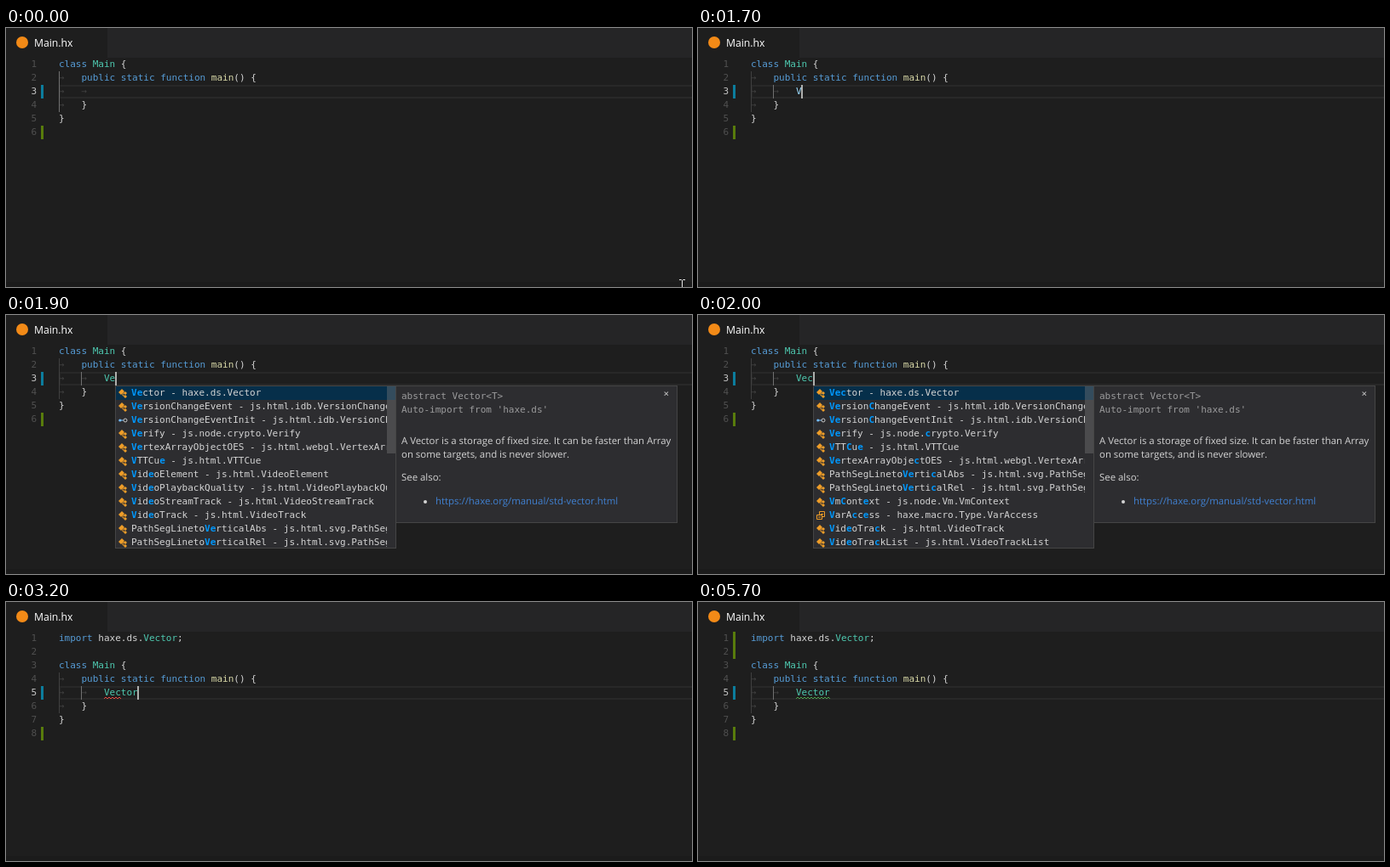
An HTML page for the animation above (6 s loop, 805 px wide and 305 px high).

```html
<!DOCTYPE html>
<html lang="en">
<head>
<meta charset="utf-8">
<title>Completion with auto-import</title>
<style>
  html, body { margin: 0; width: 100%; height: 100%; overflow: hidden; background: #1e1e1e; }
  #stage { position: relative; width: 805px; height: 305px; overflow: hidden; color: #d4d4d4;
    font: 11px/16px "DejaVu Sans Mono", monospace; white-space: pre; }
  #stage div, #stage svg { position: absolute; }
  #editor, #mouse { left: 0; top: 0; }
  .tabs { left: 0; top: 0; width: 805px; height: 35px; background: #252526; }
  .tab { left: 0; top: 0; width: 119px; height: 35px; background: #1e1e1e; }
  .logo { left: 12px; top: 10px; width: 14px; height: 14px; border-radius: 50%; background: #f28a17; }
  .title { left: 33px; top: 10px; color: #fff; font: 12.2px/16px "Open Sans", sans-serif; }
  .bottom { left: 0; top: 299px; width: 805px; height: 6px; background: #1b1b1b; }
  .current { left: 62px; width: 743px; height: 16px; box-sizing: border-box; border: 2px solid #282828; border-right: 0; }
  .number { left: 0; width: 36px; text-align: right; color: #505050; }
  .number.on { color: #c6c6c6; }
  .guide { width: 1px; background: #404040; }
  .guide.on { background: #707070; }
  .arrow { color: #414141; }
  .mark { left: 41px; width: 3px; }
  .caret { width: 2px; height: 16px; background: #aeafad; }
  .k { color: #569cd6; } .t { color: #4ec9b0; } .f { color: #dcdcaa; } .v { color: #9cdcfe; }
  .list, .docs { top: 83px; box-sizing: border-box; border: 1px solid #454545; background: #2d2d30; overflow: hidden; }
  .list { width: 330px; height: 192px; }
  .row { left: 0; width: 318px; height: 16px; overflow: hidden; }
  .row:first-child::before { content: ""; position: absolute; left: 0; top: 0; width: 330px; height: 16px; background: #062f4a; }
  .row:first-child { width: 328px; }
  .row div { left: 18px; }
  .row svg { left: 3px; top: 3px; }
  .row b { color: #0097fb; }
  .thumb { right: 0; top: 0; width: 10px; background: rgba(121, 121, 121, .4); }
  .docs { width: 331px; }
  .dim { left: 6px; color: #9b9b9c; }
  .prose { left: 6px; font: 11.4px/16px "Open Sans", sans-serif; text-rendering: geometricPrecision; }
  .prose code { font: 11px/14px "DejaVu Sans Mono", monospace; padding: 1px 4px; border-radius: 3px; background: #1f1f21; }
  .link { left: 46px; color: #4080d0; }
  .bullet { left: 32px; width: 4px; height: 4px; border-radius: 50%; background: #d4d4d4; }
  .close { right: 9px; top: 1px; color: #c5c5c5; }
</style>
</head>
<body>
<div id="stage">
  <div class="tabs"></div>
  <div class="tab"></div>
  <div class="logo"></div>
  <div class="title">Main.hx</div>
  <div class="bottom"></div>
  <div id="editor"></div>
  <svg id="mouse" width="7" height="16" fill="none" stroke="#e6e6e6">
    <path d="M0 .5H2.5L3.5 1.5L4.5 .5H7M3.5 1V15M0 15.5H2.5L3.5 14.5L4.5 15.5H7"/>
  </svg>
</div>
<script>
const LOOP = 6000, FRAME = 100, LINE = 16, TOP = 35, LEFT = 62, TAB = 26.5;
const editor = document.getElementById('editor');
const mouse = document.getElementById('mouse');

// Each step changes part of the editor state from its time on.
const steps = [
  [0, { typed: '', caret: false, popup: false, squiggle: '', width: 0, imported: false, saved: false }],
  [1100, { caret: true }],
  [1400, { typed: 'V' }],
  [1800, { popup: true }],
  [1900, { typed: 'Ve' }],
  [2000, { typed: 'Vec' }],
  [2500, { caret: false }],
  [2700, { squiggle: '#e8483f', width: 20 }],
  [3000, { caret: true }],
  [3200, { typed: 'Vector', popup: false, imported: true }],
  [3400, { saved: true }],
  [3700, { caret: false }],
  [4200, { caret: true }],
  [4300, { squiggle: '#4ba24b', width: 40 }],
  [4700, { caret: false }],
  [5200, { caret: true }],
  [5700, { caret: false }],
];

const icons = {
  class: '<path d="M0 4L4 0L7 3L3 7Z" fill="#ee9d28"/><path d="M5 5H7M5 5V8H7" stroke="#ee9d28" fill="none"/><path d="M6 5L8 3L10 5L8 7ZM6 9L8 7L10 9L8 11Z" fill="#ee9d28"/>',
  enum: '<path d="M3.5 4V.5H9.5V6.5H7M.5 4.5H6.5V9.5H.5ZM5 3.5H8M2 7H5" stroke="#ee9d28" fill="none"/>',
  struct: '<path d="M0 1H10V4H0ZM0 6H4V9H0ZM6 6H10V9H6Z" fill="#75beff"/>',
  interface: '<path d="M3 5H6" stroke="#75beff"/><circle cx="1.8" cy="5" r="1.6" fill="#75beff"/><circle cx="8" cy="5" r="2" stroke="#c5c5c5" fill="none"/>',
};
// Names with their package; "!" introduces an icon other than the class icon.
const entries = text => text.split(' ').map(item => {
  const [path, icon = 'class'] = item.split('!');
  const name = path.split('.').pop();
  return { name, icon, label: path === name ? name : `${name} - ${path}` };
});
const shared = 'js.html.idb.VersionChangeEvent js.html.idb.VersionChangeEventInit!interface js.node.crypto.Verify';
const svgTypes = 'js.html.svg.PathSegLinetoVerticalAbs js.html.svg.PathSegLinetoVerticalRel';
const lists = {
  V: entries('Void Type.ValueType!enum haxe.ds.Vector haxe.macro.Expr.Var!struct haxe.macro.Type.VarAccess!enum ' +
    'js.html.VTTCue js.html.VTTRegion js.html.ValidityState js.html.VideoElement js.html.VideoPlaybackQuality ' +
    'js.html.VideoStreamTrack js.html.VideoTrack'),
  Ve: entries(`haxe.ds.Vector ${shared} js.html.webgl.VertexArrayObjectOES js.html.VTTCue js.html.VideoElement ` +
    `js.html.VideoPlaybackQuality js.html.VideoStreamTrack js.html.VideoTrack ${svgTypes}`),
  Vec: entries(`haxe.ds.Vector ${shared} js.html.VTTCue js.html.webgl.VertexArrayObjectOES ${svgTypes} ` +
    'js.node.Vm.VmContext haxe.macro.Type.VarAccess!enum js.html.VideoTrack js.html.VideoTrackList'),
};
const voidDocs = {
  height: 164, head: ['abstract Void', '(imported)'], rows: [149, 166, 195, 222],
  text: ['The standard <code>Void</code> type. Only <code>null</code> values can be of the', 'type <code>Void</code>.'],
  link: 'https://haxe.org/manual/types-void.html',
};
const vectorDocs = {
  height: 162, head: ['abstract Vector&lt;T&gt;', "Auto-import from 'haxe.ds'"], rows: [149, 165, 192, 220],
  text: ['A Vector is a storage of fixed size. It can be faster than Array', 'on some targets, and is never slower.'],
  link: 'https://haxe.org/manual/std-vector.html',
};

const box = (cls, style, content = '') => `<div class="${cls}" style="${style}">${content}</div>`;
const span = (cls, text) => `<span class="${cls}">${text}</span>`;
const lineTop = line => TOP + (line - 1) * LINE;
const clamp = x => Math.min(Math.max(x, 0), 1);

function matchLetters(text, letters) {
  const hits = [];
  let from = 0;
  for (const letter of letters.toLowerCase()) {
    const at = text.toLowerCase().indexOf(letter, from);
    if (at < 0) return null;
    hits.push(at);
    from = at + 1;
  }
  return hits;
}

function highlight({ name, label }, typed) {
  const swapped = typed[0] + [...typed.slice(1)].reverse().join('');
  const hits = matchLetters(name, typed) || matchLetters(name, swapped) || matchLetters(label, typed) || [];
  return [...label].map((c, i) => hits.includes(i) ? `<b>${c}</b>` : c).join('');
}

function drawPopup(typed, left) {
  const rows = lists[typed].map((entry, i) => box('row', `top:${i * LINE}px`,
    `<svg width="11" height="11">${icons[entry.icon]}</svg><div>${highlight(entry, typed)}</div>`));
  const thumb = box('thumb', `height:${typed === 'V' ? 42 : 79}px`);
  const docs = typed === 'V' ? voidDocs : vectorDocs;
  const at = i => `top:${docs.rows[i] - 92}px`;
  const body = docs.head.map((text, i) => box('dim', `top:${4 + i * LINE}px`, text)).join('') +
    docs.text.map((text, i) => box('prose', at(i), text)).join('') +
    box('prose', at(2), 'See also:') +
    box('bullet', `top:${docs.rows[3] - 86}px`) +
    box('prose link', at(3), docs.link) +
    box('close', '', '×');
  return box('list', `left:${left}px`, rows.join('') + thumb) +
    box('docs', `left:${left + 329}px;height:${docs.height}px`, body);
}

function drawSquiggle(top, width, color) {
  let path = 'M0 3';
  for (let x = 2; x <= width; x += 2) path += `L${x} ${x % 4 ? 1 : 3}`;
  return `<svg style="left:115px;top:${top + 12}px" width="${width}" height="4">` +
    `<path d="${path}" fill="none" stroke="${color}"/></svg>`;
}

function drawEditor(s) {
  const shift = s.imported ? 2 : 0;
  const row = 3 + shift, top = lineTop(row);
  const caretX = Math.round(114.75 + 6.6 * s.typed.length);
  const code = [
    [0, `${span('k', 'class')} ${span('t', 'Main')} {`],
    [1, `${span('k', 'public static function')} ${span('f', 'main')}() {`],
    [2, span(s.typed.length > 1 ? 't' : 'v', s.typed)],
    [1, '}'],
    [0, '}'],
    [0, ''],
  ];
  if (s.imported) code.unshift([0, `${span('k', 'import')} haxe.ds.${span('t', 'Vector')};`], [0, '']);

  let html = box('current', `top:${top}px`);
  code.forEach(([indent, text], i) => {
    const y = lineTop(i + 1);
    html += box(i + 1 === row ? 'number on' : 'number', `top:${y}px`, i + 1);
    for (let n = 0; n < indent; n++) html += box('arrow', `left:${LEFT + n * TAB}px;top:${y}px`, '→');
    html += box('', `left:${LEFT + indent * TAB}px;top:${y}px`, text);
  });

  html += box(s.typed ? 'guide' : 'guide on', `left:62px;top:${top - LINE}px;height:48px`);
  if (s.typed) html += box('guide on', `left:88px;top:${top}px;height:16px`);
  const mark = (y, lines, color) => box('mark', `top:${y}px;height:${lines * LINE}px;background:${color}`);
  html += mark(top, 1, '#0c7d9d') + mark(lineTop(6 + shift), 1, '#587c0c');
  if (s.saved) html += mark(TOP, 2, '#587c0c');
  if (s.squiggle) html += drawSquiggle(top, s.width, s.squiggle);
  if (s.caret) html += box('caret', `left:${caretX}px;top:${top}px`);
  if (s.popup) html += drawPopup(s.typed, caretX);
  editor.innerHTML = html;
}

function drawMouse(tick) {
  const move = clamp(tick / 700);
  const ease = move * move * (3 - 2 * move);
  const lift = clamp((tick - 700) / 200);
  const x = Math.round(790 - 248 * ease);
  const y = Math.round(296 - 212 * ease - 11 * lift);
  mouse.style.transform = `translate(${x}px, ${y}px)`;
  mouse.style.visibility = tick < 1100 ? 'visible' : 'hidden';
}

// The list's scrollbar appears quickly, then fades away while idle.
function fadeThumb(tick) {
  const thumb = editor.querySelector('.thumb');
  if (thumb) thumb.style.opacity = Math.min(clamp((tick - 1750) / 150), clamp((3200 - tick) / 800));
}

let shown = -1;
function render(t) {
  const tick = Math.floor(t / FRAME) * FRAME;
  const index = steps.filter(([start]) => start <= t).length;
  if (index !== shown) {
    shown = index;
    drawEditor(Object.assign({}, ...steps.slice(0, index).map(step => step[1])));
  }
  drawMouse(tick);
  fadeThumb(tick);
}

const begin = performance.now();
function tick() {
  render((performance.now() - begin) % LOOP);
  requestAnimationFrame(tick);
}
tick();
</script>
</body>
</html>
```
